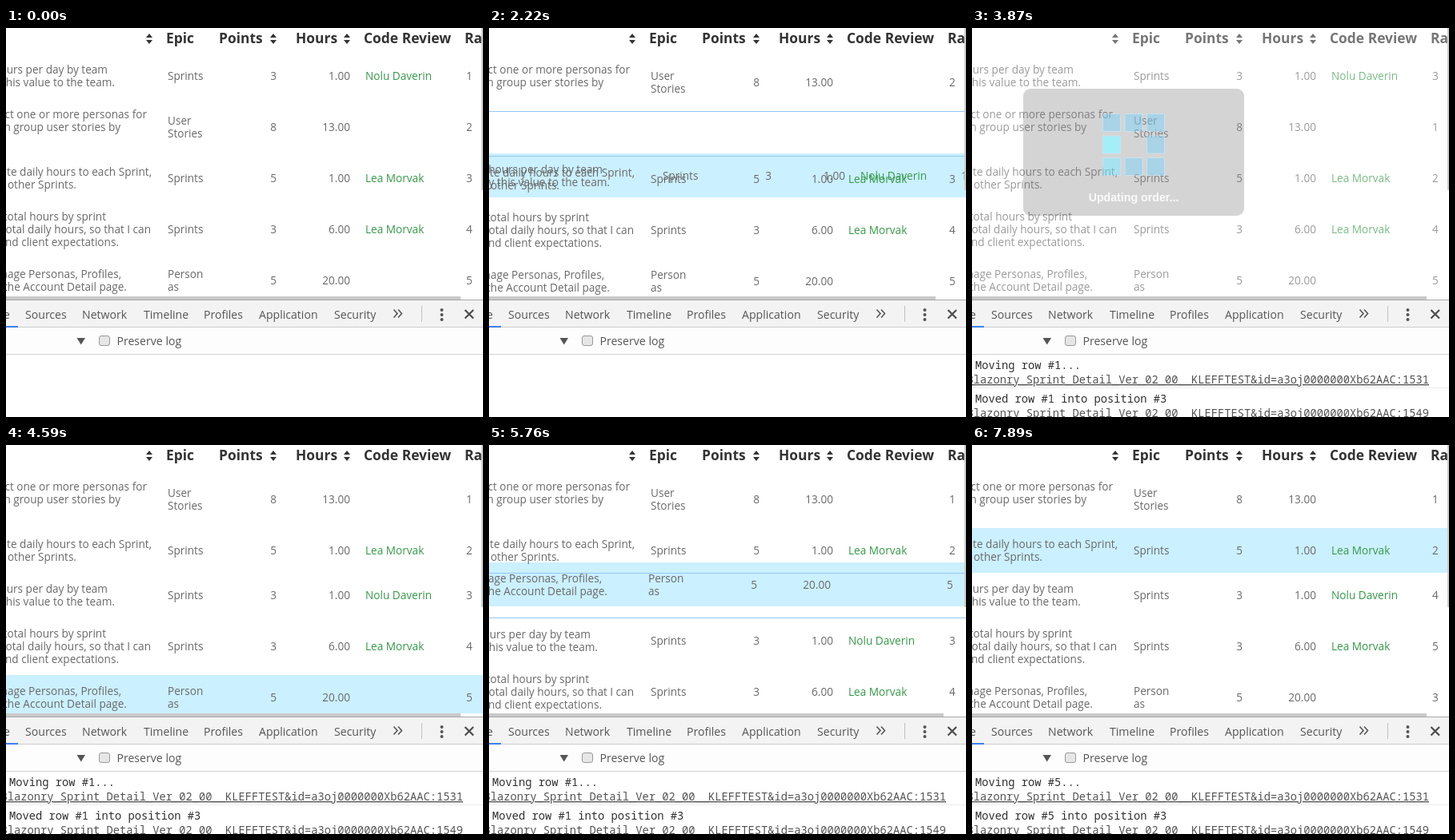
Recreate the animation shown at these times as an HTML page. Size 596 by 487 pixels, loop 8 s.

```html
<!DOCTYPE html>
<html lang="en">
<head>
<meta charset="utf-8">
<title>Reordering sprint rows</title>
<style>
  html, body { margin: 0; width: 100%; height: 100%; overflow: hidden; background: #fff; }
  svg { display: block; width: 596px; height: 487px; }
  text { white-space: pre; }
  .head { font: bold 17.4px "Open Sans", "Noto Sans", sans-serif; fill: #333; }
  .cell { font: 13.6px "Open Sans", "Noto Sans", sans-serif; fill: #696969; }
  .green { fill: #359a48; }
  .pending { font-style: italic; fill: #a9a12e; }
  .tool { font: 14.1px "Open Sans", "Noto Sans", sans-serif; fill: #555; }
  .log { font: 13.75px "Noto Sans Mono", "DejaVu Sans Mono", monospace; fill: #303030; }
  .link { fill: #545454; text-decoration: underline; }
  .busy { font: bold 14.2px "Liberation Sans", Arial, sans-serif; fill: #f6f6f6; }
</style>
</head>
<body>
<svg id="stage" viewBox="0 0 596 487"></svg>
<script>
const LOOP = 8000, STEP = 30, TOP = 32;
const stage = document.getElementById('stage');

function add(parent, tag, attrs = {}, text) {
  const el = document.createElementNS('http://www.w3.org/2000/svg', tag);
  for (const k in attrs) el.setAttribute(k, attrs[k]);
  if (text !== undefined) el.textContent = text;
  parent.appendChild(el);
  return el;
}
const rect = (p, x, y, width, height, fill, more) =>
  add(p, 'rect', { x, y, width, height, fill, ...more });
const label = (p, x, y, cls, text, anchor = 'start') =>
  add(p, 'text', { x, y, class: cls, 'text-anchor': anchor }, text);
const show = (el, on) => el.setAttribute('display', on ? 'inline' : 'none');
const move = (el, x, y) => el.setAttribute('transform', `translate(${x} ${y})`);

// story: [text, right edge] per line
const ROWS = {
  hours: { h: 56, epic: ['Sprints'], points: 3, time: '1.00', who: 'Nolu Daverin',
    story: [['set my hours per day by team', 127], ['apply this value to the team.', 136]] },
  group: { h: 72, epic: ['User', 'Stories'], points: 8, time: '13.00', who: '',
    story: [['select one or more personas for', 176], ['can group user stories by', 143]] },
  daily: { h: 56, epic: ['Sprints'], points: 5, time: '1.00', who: 'Lea Morvak',
    story: [['allocate daily hours to each Sprint,', 182], ['in other Sprints.', 88]] },
  total: { h: 72, epic: ['Sprints'], points: 3, time: '6.00', who: 'Lea Morvak',
    story: [['see total hours by sprint', 125], ['total daily hours, so that I can', 181],
            ['and client expectations.', 141]] },
  person: { h: 56, epic: ['Person', 'as'], points: 5, time: '20.00', who: '',
    story: [['manage Personas, Profiles,', 144], ['the Account Detail page.', 151]] }
};

// Table states: start, order, ranks in that order, ranks being saved, table shift
const STATES = [
  [0, 'hours group daily total person', '12345', '', 0],
  [3090, 'group daily hours total person', '12345', '123', -26],
  [3690, 'hours group daily total person', '31245', '', 0],
  [4140, 'group daily hours total person', '12345', '', 0],
  [6900, 'group daily person hours total', '12345', '345', -26],
  [7500, 'group daily hours total person', '12453', '', 0]
].map(([at, order, ranks, pending, dx]) => ({ at, order: order.split(' '), ranks, pending, dx }));

const HOVERS = [[1080, 1770, 'hours'], [4080, 4590, 'total'], [4590, 5220, 'person'], [7890, 8000, 'daily']];

// Path points: time, x, y
const DRAGS = [
  { row: 'hours', from: 1770, to: 3090,
    path: [[1740, 0, 32], [1950, 6, 82], [2220, 15, 157], [2430, 15, 185]] },
  { row: 'person', from: 5220, to: 6900,
    path: [[5190, 0, 288], [5340, 3, 245], [5760, -3, 147], [5940, -3, 133]] }
];
const WAITS = [3090, 6900];

const LOGS = [
  ['Moving row #1...', 1531, 2820], ['Moved row #1 into position #3', 1549, 3090],
  ['Moving row #5...', 1531, 6600], ['Moved row #5 into position #3', 1549, 6750]
];

// ---- table
rect(stage, 0, 0, 596, 487, '#fff');
const clip = add(add(stage, 'defs'), 'clipPath', { id: 'page' });
rect(clip, 0, 0, 596, 336, '#000');
const page = add(stage, 'g', { 'clip-path': 'url(#page)' });
const band = rect(page, 0, 0, 596, 56, '#cbf0ff');
const slot = add(page, 'path', { stroke: '#94c6f5', fill: 'none' });
const table = add(page, 'g');

for (const [x, text] of [[200, 'Epic'], [266, 'Points'], [362, 'Hours'], [447, 'Code Review'], [573, 'Rank']])
  label(table, x, 19, 'head', text);
for (const x of [179, 334, 426])
  add(table, 'path', { d: `M${x - 4} 12l4-5 4 5zM${x - 4} 15h8l-4 5z`, fill: '#333' });

for (const row of Object.values(ROWS)) {
  const g = row.el = add(table, 'g'), mid = row.h / 2 + 5;
  row.story.forEach(([text, end], i) => label(g, end, 25 + 16 * i, 'cell', text, 'end'));
  row.epic.forEach((text, i) => label(g, 202, mid + 16 * i - 8 * (row.epic.length - 1), 'cell', text));
  label(g, 338, mid, 'cell', row.points, 'end');
  label(g, 430, mid, 'cell', row.time, 'end');
  label(g, 449, mid, 'cell green', row.who);
  row.rank = label(g, 575, mid, 'cell', '');
}

// ---- waiting box
const veil = rect(page, 0, 0, 596, 336, '#fff');
const box = add(page, 'g');
rect(box, 64, 76, 276, 159, '#000', { rx: 9, 'fill-opacity': 0.31 });
const RING = [[0, 0], [1, 0], [2, 0], [2, 1], [2, 2], [1, 2], [0, 2], [0, 1]];
const tiles = RING.map(([c, r]) =>
  rect(box, 163.5 + 27.5 * c, 107.5 + 27.5 * r, 22, 22, '#62aed3', { stroke: '#9dcbe0' }));
label(box, 202, 217, 'busy', 'Updating order...', 'middle');

const thumb = rect(stage, 0, 336, 568, 4, '#c9c9c9');
rect(stage, 594, 0, 2, 203, '#c9c9c9');

// ---- developer tools
rect(stage, 0, 340, 596, 147, '#fff');
rect(stage, 0, 340, 596, 35, '#f3f3f3');
rect(stage, 0, 340, 596, 1, '#a8a8a8');
rect(stage, 0, 374, 596, 1, '#cdcdcd');
rect(stage, 0, 373, 15, 2, '#3b82f0');
rect(stage, 0, 375, 596, 33, '#fdfdfd');
rect(stage, 0, 408, 596, 1, '#d2d2d2');
label(stage, 5, 364, 'tool', 'Console', 'end');
for (const [x, text] of [[24, 'Sources'], [95, 'Network'], [172, 'Timeline'], [247, 'Profiles'],
                         [316, 'Application'], [410, 'Security']])
  label(stage, x, 364, 'tool', text);
label(stage, 138.5, 397, 'tool', 'Preserve log');
add(stage, 'path', { d: 'M484.5 352.5l4.5 5-4.5 5M490 352.5l4.5 5-4.5 5', stroke: '#555', 'stroke-width': 1.6, fill: 'none' });
rect(stage, 519, 348, 1, 20, '#c0c0c0');
for (const y of [353, 359, 365]) add(stage, 'circle', { cx: 544.5, cy: y, r: 2, fill: '#555' });
add(stage, 'path', { d: 'M573.5 353l10.5 10.5M584 353l-10.5 10.5', stroke: '#4c4c4c', 'stroke-width': 2.2 });
add(stage, 'path', { d: 'M88.5 388h10.5l-5.25 8.5z', fill: '#555' });
rect(stage, 116.5, 385.5, 13, 12, '#e6e6e6', { rx: 2.5, stroke: '#999' });

const entries = LOGS.map(([text, line, at]) => {
  const el = add(stage, 'g');
  label(el, 4, 427, 'log', text);
  label(el, 571, 445, 'log link',
    `Blazonry_Sprint_Detail_Ver_02_00__KLEFFTEST&id=a3oj0000000Xb62AAC:${line}`, 'end');
  rect(el, 0, 450, 596, 1, '#ededed');
  return { el, at };
});

// ---- motion
const clamp = v => Math.max(0, Math.min(1, v));
const swing = v => (1 - Math.cos(Math.PI * clamp(v))) / 2;

function along(path, t) {
  let i = 1;
  while (i < path.length - 1 && t > path[i][0]) i++;
  const [a, b] = [path[i - 1], path[i]], k = clamp((t - a[0]) / (b[0] - a[0]));
  return [1, 2].map(n => Math.round(a[n] + (b[n] - a[n]) * k));
}

function tops(order, extra) {
  let y = TOP;
  const out = {};
  for (const id of order) {
    out[id] = y;
    y += ROWS[id].h + (id === extra ? 1 : 0);
  }
  return out;
}

function drawTable(t) {
  const state = STATES.filter(s => s.at <= t).pop();
  const drag = DRAGS.find(d => t >= d.from && t < d.to);
  const hover = HOVERS.find(([a, b]) => t >= a && t < b);
  let place = tops(state.order), shift = 0;
  state.order.forEach((id, i) => {
    const n = state.ranks[i], rank = ROWS[id].rank;
    rank.textContent = n;
    rank.setAttribute('class', state.pending.includes(n) ? 'cell pending' : 'cell');
  });
  show(band, drag || hover);
  show(slot, drag);
  if (drag) {
    const id = drag.row, [x, y] = along(drag.path, t);
    const mid = k => (k === id ? y : place[k]) + ROWS[k].h / 2;
    place = tops([...state.order].sort((a, b) => mid(a) - mid(b)), id);
    slot.setAttribute('d', `M0 ${place[id] + 0.5}h596m-596 56h596`);
    place[id] = y;
    shift = x;
  }
  for (const id in place) move(ROWS[id].el, drag && drag.row === id ? shift : 0, place[id]);
  const lit = drag ? drag.row : hover && hover[2];
  if (lit) {
    band.setAttribute('y', place[lit]);
    band.setAttribute('height', ROWS[lit].h - (drag ? 1 : 0));
  }
  move(table, state.dx, 0);
  thumb.setAttribute('width', state.dx ? 588 : 568 - Math.max(0, shift) * 0.67);
}

function drawWait(t) {
  const start = WAITS.find(w => t >= w && t < w + 990);
  show(veil, start);
  show(box, start);
  if (!start) return;
  const age = t - start;
  const level = swing((age + 30) / 180) * (1 - swing((age - 590) / 400));
  veil.setAttribute('opacity', 0.61 * level);
  box.setAttribute('opacity', level);
  const head = age / 105;
  tiles.forEach((tile, i) => {
    const since = head < i ? 9 : (head - i) % 8;
    const glow = clamp(2 - since);
    const mix = (a, b) => Math.round(a + (b - a) * glow);
    tile.setAttribute('fill', `rgb(${mix(98, 88)},${mix(174, 224)},${mix(211, 243)})`);
  });
}

function drawLog(t) {
  const count = entries.filter(e => e.at <= t).length;
  const first = Math.max(0, count - 2);
  entries.forEach(({ el }, i) => {
    show(el, i >= first && i < count);
    move(el, 0, 42 * (i - first));
  });
}

function frame() {
  const now = performance.now() % LOOP, t = Math.floor(now / STEP) * STEP;
  drawTable(t);
  drawWait(t);
  drawLog(t);
  requestAnimationFrame(frame);
}
frame();
</script>
</body>
</html>
```
